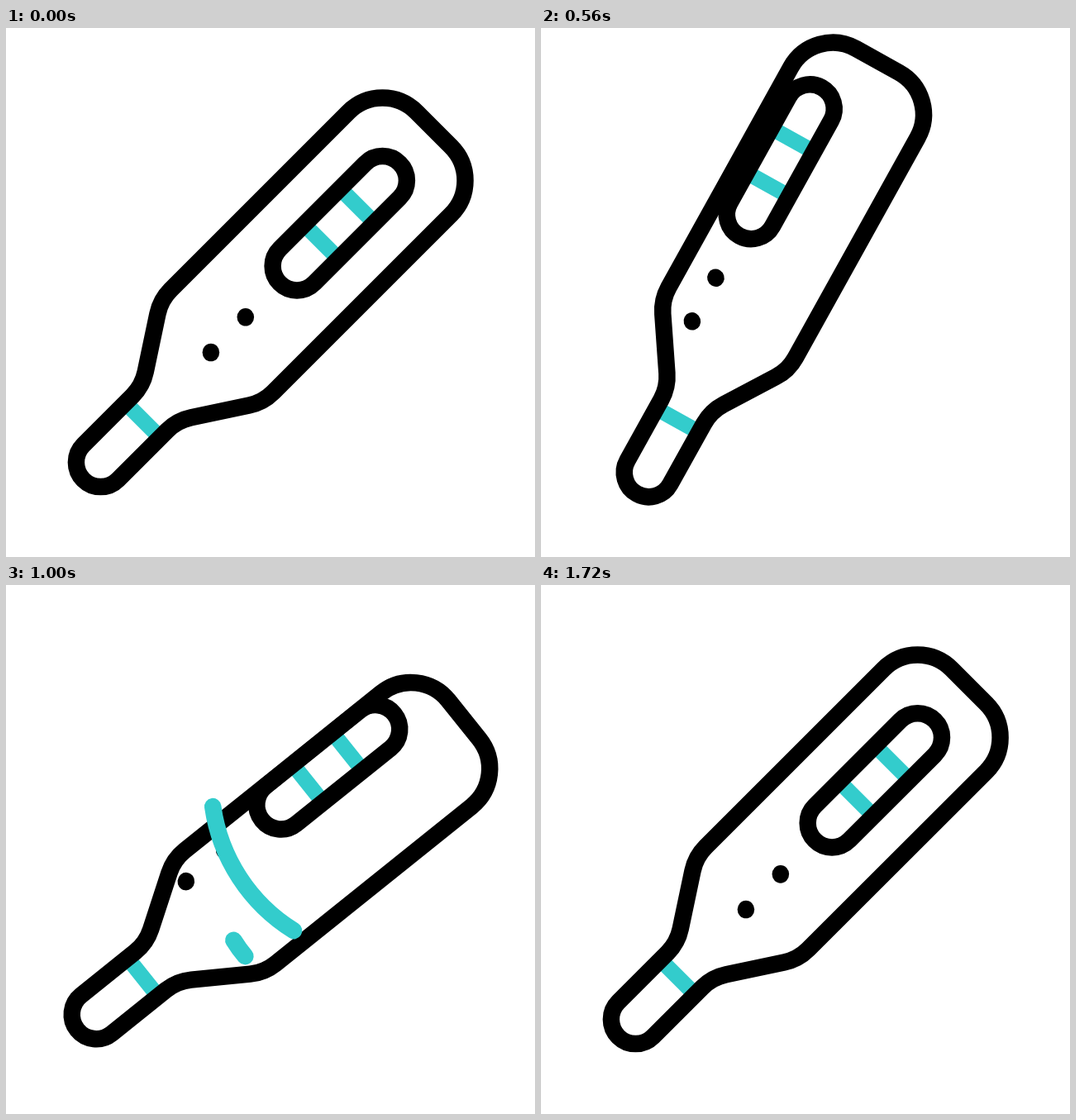
An HTML page with a canvas that plays this animation: 640x640 px, repeating every 2400 ms.

```html
<!DOCTYPE html>
<html lang="en">
<head>
<meta charset="utf-8">
<title>Thermometer</title>
<style>
  html, body { margin: 0; width: 100%; height: 100%; overflow: hidden; background: #fff; }
  canvas { display: block; width: 640px; height: 640px; }
</style>
</head>
<body>
<canvas id="stage" width="640" height="640"></canvas>
<script>
const ctx = document.getElementById('stage').getContext('2d');
const LOOP = 2400;
const BLACK = '#000';
const TEAL = '#33cccc';
const LINE = 20.5;
const PIVOT = [166, 475];
const RAD = Math.PI / 180;

// [time, value, optional skew of the ease]
const SWING = [[0, 0], [550, -16, 1.16], [930, 8], [1222, -4], [1470, 2], [1735, 0]];
// Shift of the window across and along the axis
const ROLL = [[0, 0], [480, 58.3], [720, 0], [990, 58.3], [1200, 0]];
const SLIDE = [[0, 0], [480, 3], [990, 3], [1200, 0]];

// Angles in degrees; head and tail are [start, end] times of each trim
const SWISHES = [
  { x: 432.5, y: 207.5, r: 212, from: 184.6, to: 82.7, head: [631, 1226], tail: [848, 1399] },
  { x: 399.4, y: 316.8, r: 164.5, from: 142, to: 83.1, head: [883, 1377], tail: [1062, 1521] }
];

function ease(t, start, end, skew = 1) {
  const u = Math.pow(Math.min(1, Math.max(0, (t - start) / (end - start))), skew);
  return u * u * (3 - 2 * u);
}

function track(keys, t) {
  for (let i = 1; i < keys.length; i++) {
    const [t0, v0] = keys[i - 1];
    const [t1, v1, skew] = keys[i];
    if (t < t1) return v0 + (v1 - v0) * ease(t, t0, t1, skew);
  }
  return keys[keys.length - 1][1];
}

function stroke(path, color, width = LINE, cap = 'round') {
  ctx.strokeStyle = color;
  ctx.lineWidth = width;
  ctx.lineCap = cap;
  ctx.stroke(path);
}

// Mirror across the long axis of the thermometer
const mirror = ([x, y]) => [640 - y, 640 - x];

function bodyPath() {
  const p = new Path2D();
  const shoulder = [187, 329];
  const neck = [165.2, 432.8];
  const tip = [93.6, 504.6];
  p.moveTo(300, 216);
  p.arcTo(...shoulder, ...neck, 58);
  p.arcTo(...neck, ...tip, 58);
  p.arc(114.5, 525.5, 29.6, 225 * RAD, 45 * RAD, true);
  p.arcTo(...mirror(neck), ...mirror(shoulder), 58);
  p.arcTo(...mirror(shoulder), ...mirror([300, 216]), 58);
  p.arc(497.5, 184.5, 58, 45 * RAD, -45 * RAD, true);
  p.arc(455.5, 142.5, 58, -45 * RAD, -135 * RAD, true);
  p.closePath();
  return p;
}

function windowPath() {
  const p = new Path2D();
  p.arc(455.5, 184.5, 29.4, -135 * RAD, 45 * RAD);
  p.arc(352, 288, 29.4, 45 * RAD, 225 * RAD);
  p.closePath();
  return p;
}

const BODY = bodyPath();
const WINDOW = windowPath();

function band(x, y) {
  const p = new Path2D();
  p.moveTo(x - 20, y - 20);
  p.lineTo(x + 20, y + 20);
  stroke(p, TEAL, 18.8, 'butt');
}

function dot(x, y) {
  ctx.fillStyle = BLACK;
  ctx.beginPath();
  ctx.ellipse(x, y, 10.3, 10.8, 0, 0, 2 * Math.PI);
  ctx.fill();
}

function swish(s, t) {
  if (t <= s.head[0] || t >= s.tail[1]) return;
  const at = k => (s.from + (s.to - s.from) * k) * RAD;
  const p = new Path2D();
  p.arc(s.x, s.y, s.r, at(ease(t, ...s.tail)), at(ease(t, ...s.head)), true);
  stroke(p, TEAL);
}

function draw(t) {
  ctx.fillStyle = '#fff';
  ctx.fillRect(0, 0, 640, 640);

  ctx.save();
  ctx.translate(...PIVOT);
  ctx.rotate(track(SWING, t) * RAD);
  ctx.translate(-PIVOT[0], -PIVOT[1]);

  band(166, 475);

  ctx.save();
  const roll = track(ROLL, t) * Math.SQRT1_2;
  const slide = track(SLIDE, t) * Math.SQRT1_2;
  ctx.translate(-roll - slide, -roll + slide);
  band(425, 215);
  band(381.5, 258.5);
  stroke(WINDOW, BLACK);
  dot(289.8, 349.8);
  dot(247.9, 392.5);
  ctx.restore();

  stroke(BODY, BLACK);
  SWISHES.forEach(s => swish(s, t));
  ctx.restore();
}

let start = null;
function tick(now) {
  if (start === null) start = now;
  draw((now - start) % LOOP);
  requestAnimationFrame(tick);
}
draw(0);
requestAnimationFrame(tick);
</script>
</body>
</html>
```
